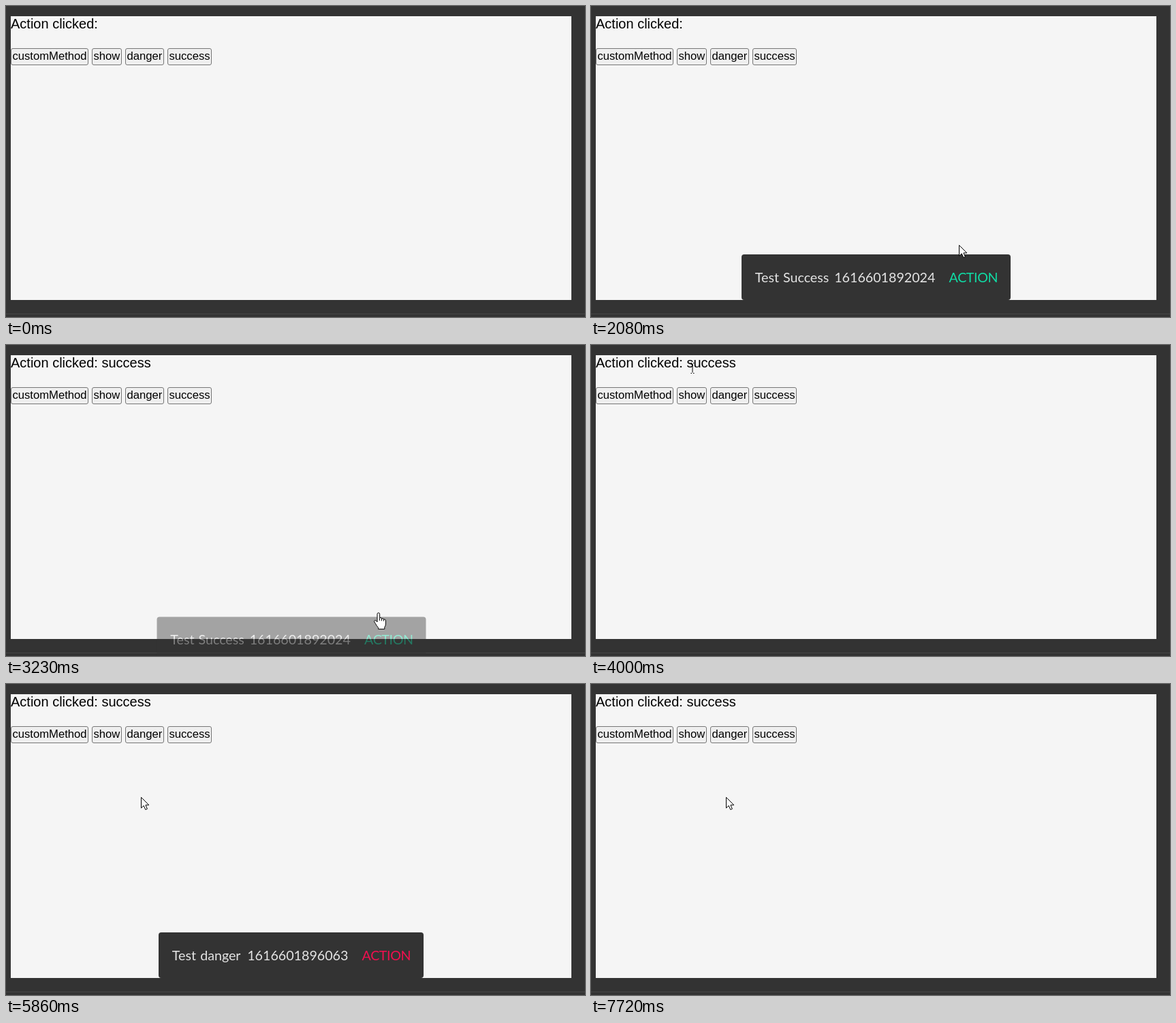
An HTML page for the animation above (8000 ms loop, 850 px wide and 457 px high).

```html
<!DOCTYPE html>
<html lang="en">
<head>
<meta charset="utf-8">
<title>Snackbar demo</title>
<style>
  html, body { margin: 0; width: 100%; height: 100%; overflow: hidden; background: #333; }
  svg { display: block; width: 850px; height: 457px; }
  .line { font: 20px "Liberation Sans", Arial, sans-serif; }
  .btn text { font: 16.667px "Liberation Sans", Arial, sans-serif; }
  .toast text { font: 19.66px Lato, Carlito, sans-serif; fill: #e4e4e4; }
  .toast .action { letter-spacing: -.4px; }
</style>
</head>
<body>
<svg id="stage" viewBox="0 0 850 457">
  <rect width="850" height="457" fill="#333"/>
  <rect y="452" width="850" height="1" fill="#474747"/>
  <rect x="7" y="15" width="823" height="417" fill="#f5f5f5"/>
  <text class="line" id="line" x="7" y="33"></text>
  <g id="buttons"></g>
  <g id="toasts"></g>
  <g id="pointer" stroke="#000" stroke-linejoin="round">
    <path id="arrow" fill="#fff" d="M.5.5V16.2L4.2 12.8 6.8 18.6 9.4 17.5 6.9 11.9H11.8Z"/>
    <g id="hand" transform="translate(-7 0)" fill="#fff">
      <path d="M5 14V2.5Q5 .6 6.8.6T8.6 2.5V7.7Q11.3 7 11.5 9 14.2 8.2 14.4 10 17.4 9.6 17.4 12V17Q17.4 19.5 15.8 21.5V24.4H6.6V22.5Q4 19.5 2.5 16.5L.7 13.8Q.2 12 1.8 11.6 3.4 11.6 5 14Z"/>
      <path fill="none" d="M8.6 7.7V12M11.5 9V12.4M14.4 10V12.8"/>
    </g>
    <path id="ibeam" fill="none" d="M-2.5-7.5H-1M1-7.5H2.5M0-6.5V6.5M-2.5 7.5H-1M1 7.5H2.5"/>
  </g>
</svg>
<script>
const LOOP = 8000, TICK = 75, HIDE = 300;
const $ = id => document.getElementById(id);

function add(parent, tag, attrs, text) {
  const el = document.createElementNS("http://www.w3.org/2000/svg", tag);
  for (const k in attrs) el.setAttribute(k, attrs[k]);
  if (text) el.textContent = text;
  return parent.appendChild(el);
}

const buttons = [["customMethod", 7, 114], ["show", 126, 44], ["danger", 175, 57], ["success", 237, 65]]
  .map(([label, x, w]) => {
    const g = add($("buttons"), "g", { class: "btn" });
    const box = add(g, "rect", { x: x + .5, y: 62.5, width: w - 1, height: 24, rx: 2.5 });
    add(g, "text", { x: x + 2.4, y: 79 }, label);
    return { label, x, w, box };
  });

// words: [text, x]; first hide sample at `hide`, `lead` ms into the transition
const toasts = [
  { x: 221, w: 395, show: 1310, hide: 3155, lead: 15, color: "#10dba4", action: 525.6,
    words: [["Test", 240.8], ["Success", 282], ["1616601892024", 357.2]] },
  { x: 224, w: 389, show: 5240, hide: 7340, lead: 0, color: "#f0104f", action: 522.6,
    words: [["Test", 243.8], ["danger", 285.2], ["1616601896063", 354.2]] }
];
for (const t of toasts) {
  t.el = add($("toasts"), "g", { class: "toast" });
  add(t.el, "rect", { x: t.x, y: 365, width: t.w, height: 67, rx: 4, fill: "#333" });
  for (const [word, x] of t.words) add(t.el, "text", { x, y: 406 }, word);
  add(t.el, "text", { x: t.action, y: 406, class: "action", style: "fill:" + t.color }, "ACTION");
}

// pointer moves: [first step, last step, steps, x, y]
const start = [814, 494];
const moves = [
  [220, 600, 6, 233, 198], [750, 1160, 6, 272, 70],
  [1710, 2080, 6, 540, 351], [2160, 2310, 3, 547, 388], [2710, 2780, 2, 547, 393],
  [3385, 3770, 6, 170, 39], [3850, 4000, 3, 149, 34],
  [4150, 4380, 4, 211, 31], [4460, 4690, 4, 148, 33], [4770, 4940, 3, 167, 37],
  [5010, 5090, 2, 208, 70], [5470, 5630, 3, 199, 166], [5860, 5860, 1, 198, 166]
];

function pointerAt(t) {
  let [x, y] = start;
  for (const [t0, t1, n, tx, ty] of moves) {
    if (t < t0) break;
    const step = t >= t1 ? n : Math.floor((t - t0) / (t1 - t0) * (n - 1) + .02) + 1;
    x += (tx - x) * step / n;
    y += (ty - y) * step / n;
  }
  return [Math.round(x), Math.round(y)];
}

// cubic-bezier(.25, .1, .25, 1)
function ease(p) {
  const curve = (a, b, s) => 3 * a * s * (1 - s) ** 2 + 3 * b * s * s * (1 - s) + s ** 3;
  let lo = 0, hi = 1;
  for (let i = 0; i < 24; i++) {
    const mid = (lo + hi) / 2;
    if (curve(.25, .25, mid) < p) lo = mid; else hi = mid;
  }
  return curve(.1, 1, lo);
}

const inside = (x, y, l, t, r, b) => x >= l && x < r && y >= t && y < b;

function drawToast(toast, t) {
  const hiding = t >= toast.hide;
  const elapsed = hiding ? toast.lead + Math.floor((t - toast.hide) / TICK + .01) * TICK : 0;
  const p = ease(Math.min(1, elapsed / HIDE));
  toast.open = t >= toast.show && elapsed < HIDE;
  toast.el.style.display = toast.open ? "" : "none";
  toast.el.setAttribute("opacity", Math.max(0, 1 - 1.14 * p));
  toast.el.setAttribute("transform", `translate(${hiding ? .5 : 0} ${67 * p})`);
}

function render(t) {
  const [x, y] = pointerAt(t), present = t >= 220;
  $("line").textContent = "Action clicked:" + (t >= 3090 ? " success" : "");
  for (const toast of toasts) drawToast(toast, t);

  let shape = inside(x, y, 7, 15, t >= 3090 ? 213 : 135, 38.5) ? "ibeam" : "arrow";
  for (const b of buttons) {
    const over = present && inside(x, y, b.x, 62, b.x + b.w, 87);
    const pressed = over && toasts.some(s => t >= s.show && t < s.show + 85);
    b.box.setAttribute("fill", pressed ? "#f5f5f5" : over ? "#e5e5e5" : "#efefef");
    b.box.setAttribute("stroke", pressed ? "#8d8d8d" : over ? "#4f4f4f" : "#767676");
    if (over) shape = "hand";
  }
  if (toasts.some(s => s.open && inside(x, y, s.action, 385, s.action + 72, 415))) shape = "hand";

  $("pointer").style.display = present ? "" : "none";
  $("pointer").setAttribute("transform", `translate(${x} ${y})`);
  for (const id of ["arrow", "hand", "ibeam"]) $(id).style.display = id === shape ? "" : "none";
}

const begin = performance.now();
function frame() {
  render((performance.now() - begin) % LOOP);
  requestAnimationFrame(frame);
}
frame();
</script>
</body>
</html>
```
